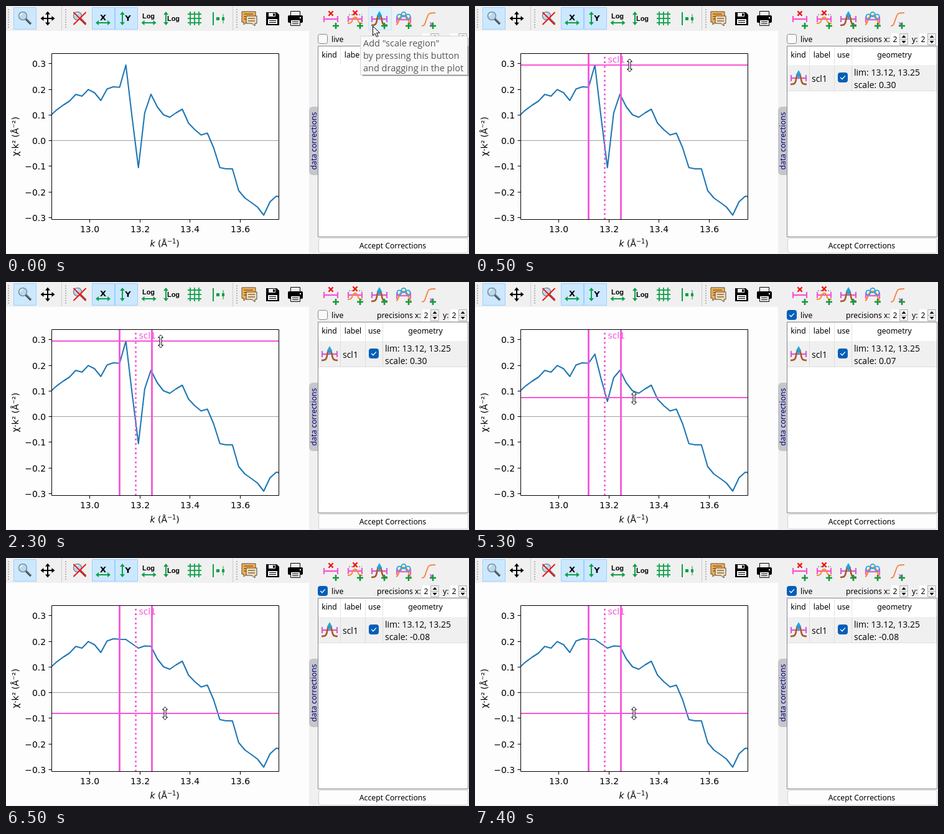
An HTML page with a canvas for the animation above (8000 ms loop, 744x399 px).

```html
<!DOCTYPE html>
<html lang="en">
<head>
<meta charset="utf-8">
<title>Scale region</title>
<style>
html, body { margin: 0; width: 100%; height: 100%; overflow: hidden; background: #f0f0f0; }
canvas { display: block; }
</style>
</head>
<body>
<canvas id="stage" width="744" height="399"></canvas>
<script>
const ctx = document.getElementById('stage').getContext('2d');
const UI = '12.2px "Noto Sans", sans-serif', CELL = '"Open Sans", sans-serif', PLOT = '"DejaVu Sans", sans-serif';
const GREEN = '#0da04a', PINK = '#f655d8', RED = '#f01414', ORANGE = '#f58a1f', CYAN = '#1fa5e0', BLUE = '#005fb8';
const LOOP = 8000;

// spike: the five curve heights inside the region
const states = [
  { start: 0, spike: [95, 180, 260, 172, 142], tooltip: true },
  { start: 500, spike: [95, 180, 260, 172, 142], level: 95, scale: '0.30', cursor: [248.5, 95.5] },
  { start: 3500, spike: [116, 156, 192, 154, 142], level: 186, scale: '0.07', cursor: [255.5, 187], live: true },
  { start: 6500, spike: [131, 138, 145, 141.5, 142], level: 250, scale: '-0.08', cursor: [255.5, 250], live: true }
];
const before = [176, 166.8, 159.5, 153, 142.3, 145, 134.4, 139.5, 152, 133.5, 130, 130.7];
const after = [162, 175, 179, 172, 166, 188.5, 199, 207.5, 204.5, 228, 260, 262, 262, 297, 309,
  316, 323.5, 336.5, 315, 306, 308];

function rect(x, y, w, h, fill, edge, radius = 0) {
  ctx.beginPath();
  ctx.roundRect(edge ? x + .5 : x, edge ? y + .5 : y, edge ? w - 1 : w, edge ? h - 1 : h, radius);
  if (fill) { ctx.fillStyle = fill; ctx.fill(); }
  if (edge) { ctx.strokeStyle = edge; ctx.lineWidth = 1; ctx.stroke(); }
}

function path(points, color, width = 1, fill) {
  ctx.beginPath();
  points.forEach(([x, y]) => ctx.lineTo(x, y));
  if (fill) { ctx.closePath(); ctx.fillStyle = fill; ctx.fill(); }
  if (color) { ctx.strokeStyle = color; ctx.lineWidth = width; ctx.stroke(); }
}

function line(x1, y1, x2, y2, color, width = 1) {
  path([[x1, y1], [x2, y2]], color, width);
}

function curve(d, color, width = 2, fill) {
  const p = new Path2D(d);
  if (fill) { ctx.fillStyle = fill; ctx.fill(p); }
  if (color) { ctx.strokeStyle = color; ctx.lineWidth = width; ctx.stroke(p); }
}

function circle(x, y, r, fill, edge, width = 1) {
  ctx.beginPath();
  ctx.arc(x, y, r, 0, 7);
  if (fill) { ctx.fillStyle = fill; ctx.fill(); }
  if (edge) { ctx.strokeStyle = edge; ctx.lineWidth = width; ctx.stroke(); }
}

function text(s, x, y, font, color = '#000', align = 'left') {
  ctx.font = font;
  ctx.fillStyle = color;
  ctx.textAlign = align;
  ctx.fillText(s, x, y);
  return x + ctx.measureText(s).width;
}

function at(x, y, angle, draw) {
  ctx.save();
  ctx.translate(x, y);
  ctx.rotate(angle);
  draw();
  ctx.restore();
}

const upright = (s, x, y, font, color) =>
  at(x, y, -Math.PI / 2, () => text(s, 0, 0, font, color, 'center'));

function cross(x, y, r, color, width) {
  line(x - r, y - r, x + r, y + r, color, width);
  line(x - r, y + r, x + r, y - r, color, width);
}

function plus(x, y) {
  line(x - 5, y, x + 5, y, '#149a3c', 2.6);
  line(x, y - 5, x, y + 5, '#149a3c', 2.6);
}

function doubleArrow(x, y, half, angle, color = GREEN, width = 2, head = 4) {
  at(x, y, angle, () => {
    line(-half + 2, 0, half - 2, 0, color, width);
    for (const s of [-1, 1])
      path([[s * half, 0], [s * (half - head - 1), -head], [s * (half - head - 1), head]], null, 0, color);
  });
}

function magnifier(x, y) {
  line(x + 4, y + 4, x + 13, y + 13, '#454b52', 3.4);
  line(x + 6, y + 5, x + 13, y + 12, '#8d959c', 1);
  circle(x, y, 6.5, '#b9d9ee', '#7f8f9c', 1.6);
  curve(`M${x - 4} ${y}q0-4 4-4`, '#f4fbff', 1.5);
}

function grip(x) {
  for (let y = 5; y < 37; y += 4) rect(x, y, 2, 2, '#b4b4b4');
}

function toolbar() {
  for (const x of [12, 138, 175]) rect(x, 2, 37, 36, '#cce8ff', '#99d1ff');
  [3, 95, 370].forEach(grip);
  for (const x of [89.5, 364.5]) line(x, 1, x, 39, '#cfcfcf');

  magnifier(27, 16);
  doubleArrow(67, 20, 11.5, 0, '#000', 2);
  doubleArrow(67, 20, 11.5, Math.PI / 2, '#000', 2);
  magnifier(115, 16);
  cross(118.5, 20, 10, RED, 2);

  const letter = `bold 13px ${PLOT}`;
  text('X', 156, 23, letter, '#000', 'center');
  doubleArrow(156, 27, 12, 0);
  doubleArrow(187, 20, 11, Math.PI / 2);
  text('Y', 196, 24, letter, '#000', 'center');
  const log = 'bold 11px "Liberation Sans", sans-serif';
  text('Log', 229, 20, log, '#000', 'center');
  doubleArrow(229.5, 27, 12, 0);
  doubleArrow(257, 20, 11, Math.PI / 2);
  text('Log', 269, 24, log, '#000', 'center');

  for (const d of [-7, 0, 7]) {
    line(303 + d, 9, 303 + d, 31, GREEN, 1.8);
    line(292, 20 + d, 314, 20 + d, GREEN, 1.8);
  }
  line(333, 10, 333, 31, GREEN, 2);
  rect(338, 18, 5, 5, GREEN);
  line(349, 13, 349, 28, GREEN, 1);
  rect(347, 18, 4, 5, GREEN);

  // note, disk, printer
  curve('M379 9h22v17h-14l-5 4v-4h-3z', '#5a4a38', 1, '#f6b052');
  for (const y of [13, 17, 21]) line(382, y, 397, y, '#6a4a20', 1.2);
  curve('M386 16h17v12h-3v4l-5-4h-9z', '#444', 1, '#fcdcae');
  for (const y of [20, 24]) line(389, y, 400, y, '#444', 1.1);

  curve('M418 10h17l4 4v17h-21z', null, 0, '#000');
  rect(422, 11, 11, 6, '#f0f0f0');
  rect(429, 12, 3, 4, '#000');
  rect(421, 21, 15, 8, '#f0f0f0');
  line(423, 23.5, 434, 23.5, '#000', 1);
  line(423, 26.5, 434, 26.5, '#000', 1);

  rect(453, 15, 24, 12, '#000', null, 2);
  rect(457, 8, 16, 8, '#f0f0f0', '#000');
  rect(457, 22, 16, 10, '#f0f0f0', '#000');
  line(460, 25.5, 470, 25.5, '#000');
  line(460, 28.5, 470, 28.5, '#000');
  rect(472, 18, 2, 2, '#fff');
}

function bracket(x, y, color = PINK, half = 11) {
  line(x - half, y, x + half, y, color, 2.4);
  for (const s of [-half, half]) line(x + s, y - 5, x + s, y + 5, color, 2.2);
}

function peakIcon(x, y) {
  bracket(x, y + 2, '#d65cd6', 12);
  curve(`M${x - 13} ${y + 12}c7 0 8-2 9-8c1-6 1-7 4-7s3 1 4 7c1 6 2 8 9 8`, '#a55a28', 2.6);
  line(x, y - 4, x, y + 2, CYAN, 3);
  path([[x, y - 11], [x - 4.5, y - 3], [x + 4.5, y - 3]], null, 0, CYAN);
}

function correctionTools(hover) {
  if (hover) rect(582, 2, 38, 37, '#e0f1fb', '#c4e4f8');
  bracket(522, 21);
  cross(522, 12, 3.6, RED, 2.2);

  bracket(561, 21);
  curve('M549 28c6 0 7-2 8-7q4-6 8 0c1 5 2 7 8 7', ORANGE, 2);
  ctx.setLineDash([2, 2]);
  line(551, 14, 572, 14, '#555', 1);
  ctx.setLineDash([]);
  cross(561, 11, 3.6, RED, 2.2);

  peakIcon(600, 19);

  bracket(639, 22);
  curve('M627 30c6-2 3-15 12-15s6 13 12 15', ORANGE, 2);
  for (const [x, y] of [[632, 17], [639, 13.5], [646, 17]]) circle(x, y, 3.6, null, CYAN, 1.8);

  curve('M668 32c5 0 5-3 7-9l3-8c1-3 3-4 12-4', '#f5884a', 2);
  cross(684, 29, 2.6, '#d34fd3', 1.5);

  for (const x of [530, 569, 608, 647, 686]) plus(x, 32);
}

function checkbox(x, y, checked) {
  rect(x, y, 16, 16, checked ? BLUE : '#fafafa', checked ? BLUE : '#868686', 3);
  if (checked) path([[x + 4.3, y + 8], [x + 7, y + 10.7], [x + 11.8, y + 5.4]], '#fff', 1.3);
}

function spinner(label, labelX, x) {
  text(label, labelX, 58, UI);
  rect(x, 44, 28, 19, '#fff');
  text('2', x + 2.5, 58, UI);
  for (const [y, s] of [[44, -1], [53, 1]]) {
    rect(x + 13, y, 14, 10, '#f0f0f0', '#b0b0b0');
    const mid = y + 5;
    path([[x + 16.5, mid - s * 2], [x + 23.5, mid - s * 2], [x + 20, mid + s * 2]], null, 0, '#000');
  }
}

function panel(state) {
  correctionTools(state.tooltip);
  checkbox(501, 45, state.live);
  text('live', 523, 58, UI);
  spinner('precisions x:', 596, 669);
  spinner('y:', 702, 714);

  rect(487, 162, 20, 110, '#c6c6ca', null, 6);
  upright('data corrections', 499, 217, UI, '#00007f');

  rect(501, 64, 242, 308, '#fff', '#828790');
  const columns = { kind: 519.5, label: 557.5, use: 592, geometry: 674 };
  for (const [name, x] of Object.entries(columns)) text(name, x, 83, UI, '#000', 'center');
  const dividers = [537.5, 577.5, 605.5];
  for (const x of dividers) line(x, 65, x, 94, '#e2e2e2');

  if (state.scale) {
    rect(502, 95, 240, 42, '#f0f0f0');
    for (const x of dividers) line(x, 95, x, 137, '#dcdcdc');
    line(502, 136.5, 742, 136.5, '#dcdcdc');
    peakIcon(520, 114);
    const cell = `14px ${CELL}`;
    text('scl1', 541, 122, cell);
    checkbox(583, 107, true);
    text('lim: 13.12, 13.25', 609, 112, cell);
    text('scale: ' + state.scale, 609, 132, cell);
  }

  rect(502, 373, 241, 25, '#fdfdfd', '#d0d0d0', 4);
  text('Accept Corrections', 621.5, 390, UI, '#000', 'center');
}

function plot(state) {
  const font = `13.9px ${PLOT}`;
  rect(0, 40, 487, 358, '#fdfdfd');
  rect(73, 76, 366, 268, '#fff');

  ctx.save();
  ctx.beginPath();
  ctx.rect(73, 76, 366, 268);
  ctx.clip();
  line(73, 216.5, 439, 216.5, '#a0a0a0', 1.2);
  ctx.lineJoin = 'round';
  path([...before, ...state.spike, ...after].map((y, i) => [71.8 + 10.07 * i, y]), '#1f77b4', 2.1);
  ctx.lineJoin = 'miter';
  if (state.level) {
    line(73, state.level, 439, state.level, PINK, 2.1);
    for (const x of [182.5, 234.5]) line(x, 76, x, 344, PINK, 2.8);
    ctx.setLineDash([2.8, 4.6]);
    line(208.5, 343.5, 208.5, 76, PINK, 2.8);
    ctx.setLineDash([]);
    text('scl1', 213.5, 91, font, PINK);
  }
  ctx.restore();

  rect(73, 76, 366, 268, null, '#000');
  for (let i = -3; i <= 3; i++) {
    const y = Math.round(217 - i * 41.25) - .5;
    line(68.5, y, 73, y, '#000');
    text((i < 0 ? '−' : '') + (Math.abs(i) / 10).toFixed(1), 64, y + 5.5, font, '#000', 'right');
  }
  for (let i = 0; i < 4; i++) {
    const x = Math.round(134 + i * 80.6) + .5;
    line(x, 344, x, 348.5, '#000');
    text((13 + i * .2).toFixed(1), x, 363.5, font, '#000', 'center');
  }
  let x = text('k', 231.5, 387, 'italic ' + font);
  x = text(' (Å', x, 387, font);
  x = text('−1', x, 382, `9.7px ${PLOT}`);
  text(')', x, 387, font);
  upright('χ·k² (Å⁻²)', 20, 210, font);
}

function tooltip() {
  rect(572, 51, 172, 62, 'rgba(0,0,0,.18)');
  rect(569, 48, 173, 63, '#f9f9f9', '#d4d4d4');
  line(573, 111.5, 743, 111.5, '#8a8a8a');
  ['Add "scale region"', 'by pressing this button', 'and dragging in the plot'].forEach((s, i) =>
    text(s, 574, 65 + 20 * i, `14.5px ${CELL}`, '#575757'));
}

function pointer(x, y) {
  curve(`M${x} ${y}v15l3.5-3.3 2.5 5.3 2.5-1.1-2.4-5.2h4.9z`, '#000', 1, '#fff');
}

function resizeCursor([x, y]) {
  curve(`M${x} ${y - 10.5}l4 4.5h-2.5v12h2.5l-4 4.5-4-4.5h2.5v-12h-2.5z`, '#000', 1, '#fff');
}

function draw(state) {
  rect(0, 0, 744, 399, '#f0f0f0');
  toolbar();
  plot(state);
  panel(state);
  if (state.tooltip) {
    tooltip();
    pointer(589.5, 32.5);
  } else {
    resizeCursor(state.cursor);
  }
}

function tick(now) {
  const t = now % LOOP;
  draw(states.findLast(s => t >= s.start));
  requestAnimationFrame(tick);
}
tick(0);
</script>
</body>
</html>
```
